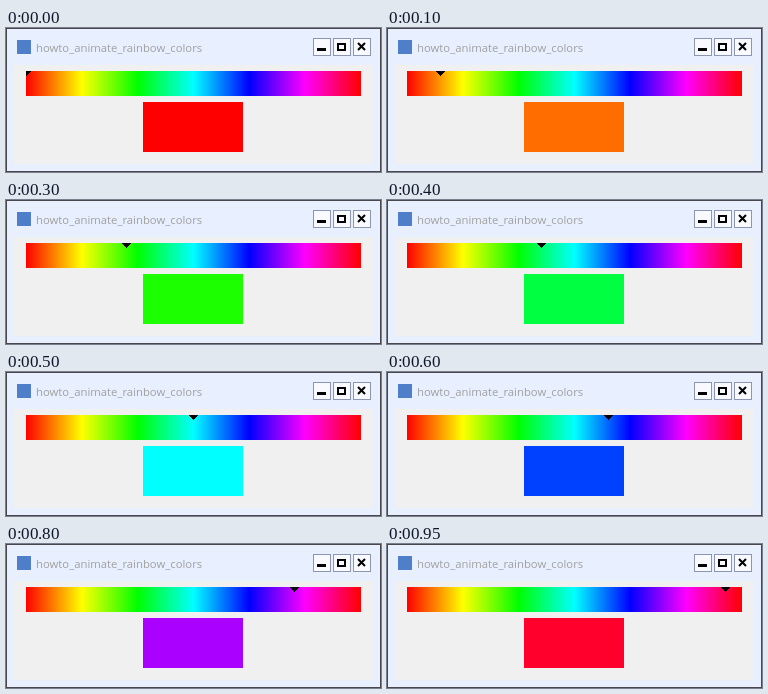
An HTML page that plays this animation: 375 by 144 pixels, repeating every 1000 ms.

```html
<!DOCTYPE html>
<html lang="en">
<head>
<meta charset="utf-8">
<title>Rainbow colors</title>
<style>
  html, body { margin: 0; width: 100%; height: 100%; overflow: hidden; }
  svg { display: block; }
  text { font: 11.3px "Open Sans", "Noto Sans", sans-serif; fill: #a0a0a0; }
  .button { fill: #f8faff; stroke: #8c95b2; }
  .glyph { fill: none; stroke: #000; stroke-width: 2; }
</style>
</head>
<body>
<svg width="375" height="144" viewBox="0 0 375 144">
  <defs>
    <linearGradient id="rainbow"></linearGradient>
    <clipPath id="strip"><rect x="20" y="43" width="335" height="25"/></clipPath>
  </defs>
  <rect x=".5" y=".5" width="374" height="143" fill="#e8f0ff" stroke="#49474b"/>
  <rect x="8" y="37" width="359" height="99" fill="#f0f0f0"/>
  <rect x="11" y="12" width="14" height="14" fill="#4f7fc8"/>
  <text x="30" y="24">howto_animate_rainbow_colors</text>
  <g class="button">
    <rect x="307.5" y="10.5" width="17" height="17"/>
    <rect x="327.5" y="10.5" width="17" height="17"/>
    <rect x="347.5" y="10.5" width="17" height="17"/>
  </g>
  <g class="glyph">
    <path d="M311 21.5h9" stroke-width="3"/>
    <path d="M332 16h7v6h-7z"/>
    <path d="M352 15l7 7M359 15l-7 7"/>
  </g>
  <rect x="20" y="43" width="335" height="25" fill="url(#rainbow)"/>
  <g clip-path="url(#strip)">
    <path id="marker" d="M-5 43h10l-5 5z" shape-rendering="crispEdges"/>
  </g>
  <rect id="swatch" x="137" y="74" width="100" height="50" fill="#f00"/>
</svg>
<script>
const STEPS = 20, LOOP = 1000;
const byId = id => document.getElementById(id);
const marker = byId('marker'), swatch = byId('swatch');

byId('rainbow').innerHTML = ['#f00', '#ff0', '#0f0', '#0ff', '#00f', '#f0f', '#f00']
  .map((c, i) => `<stop offset="${i / 6}" stop-color="${c}"/>`).join('');

// Blend weights sum to one, then scale so the largest channel is full.
function channel(pos, center) {
  const gap = Math.abs(pos - center);
  const v = Math.max(0, Math.min(1, 2 - Math.min(gap, 6 - gap)));
  return Math.round(255 * v / (2 - v));
}

function draw(now) {
  const step = Math.floor(now % LOOP / LOOP * STEPS);
  const part = step / STEPS;
  marker.setAttribute('transform', `translate(${20 + 335 * part})`);
  swatch.setAttribute('fill', `rgb(${[0, 2, 4].map(c => channel(part * 6, c))})`);
}

const start = performance.now();
function tick() {
  draw(performance.now() - start);
  requestAnimationFrame(tick);
}
tick();
</script>
</body>
</html>
```
